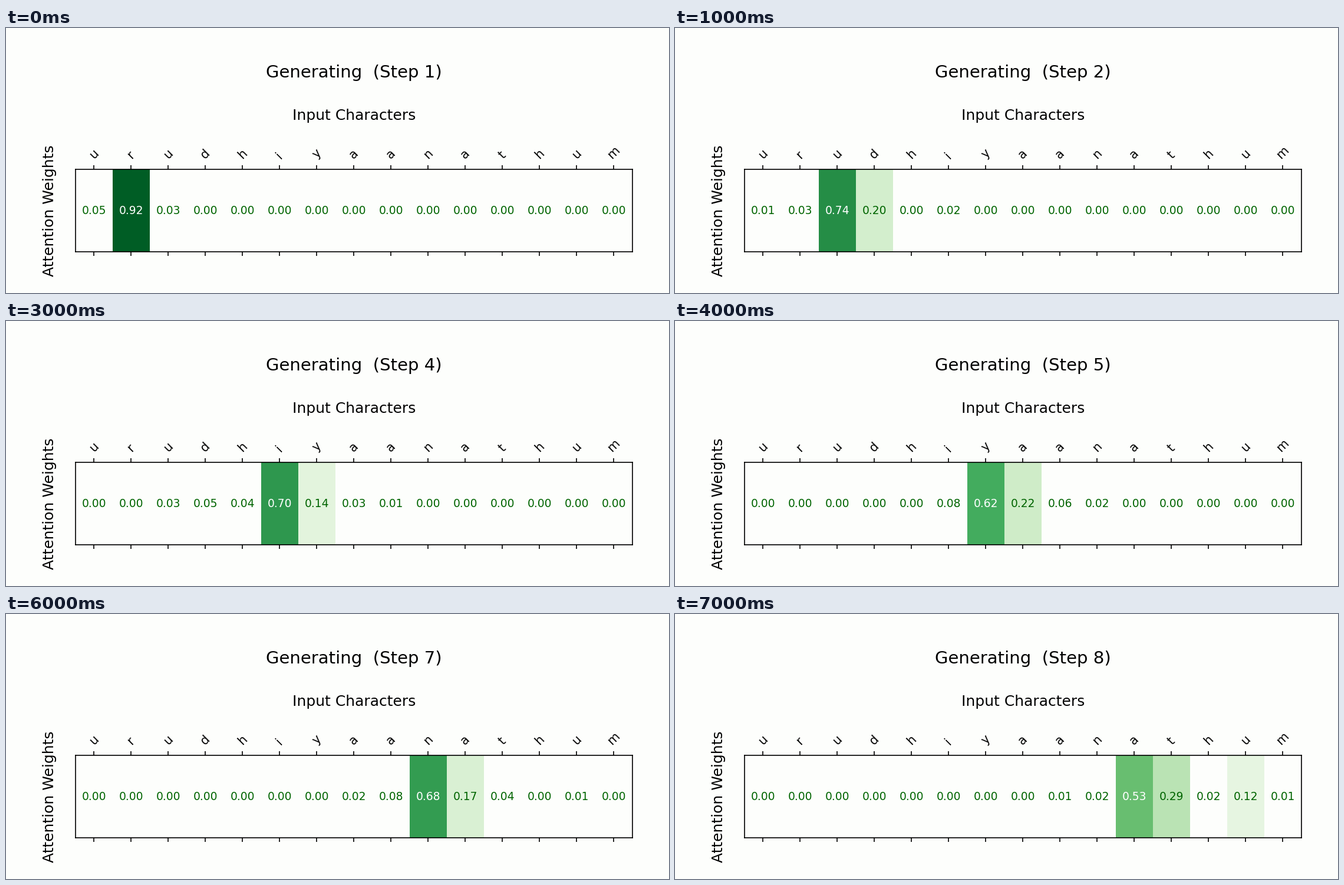
Recreate the animation shown at these times as a matplotlib script. Size 1125 px wide and 450 px high, loop 8 s.

```python
import numpy as np
import matplotlib.pyplot as plt
from matplotlib.animation import FuncAnimation

W, H, DPI = 1125, 450, 150
LEFT, TOP, CELL, TALL = 117.8, 240, 63, 140
CHARS = "urudhiyaanathum"
PAPER = "#fdfefc"

PULL = {"h": 0.15, "i": 3, "u": 3}  # letters that draw less or more attention
FOCUS = [0.92, 0.74, 0.57, 0.70, 0.62, 0.40, 0.68, 0.53]  # weight at the peak
BEHIND = [0.05, 0.04, 0.21, 0.13, 0.08, 0.01, 0.10, 0.03]  # weight left of it

plt.rcParams["font.family"] = "DejaVu Sans"
n = len(CHARS)
cols = np.arange(n)
pull = np.array([PULL.get(c, 1) for c in CHARS])

fig = plt.figure(figsize=(W / DPI, H / DPI), dpi=DPI, facecolor=PAPER)
ax = fig.add_axes([LEFT / W, 1 - (TOP + TALL) / H, n * CELL / W, TALL / H],
                  facecolor=PAPER)


def label(x, y, text, size, **kw):
    """Place text with its baseline at pixel coordinates from the top left."""
    return fig.text(x / W, 1 - y / H, text, size=size, ha="center",
                    va="baseline", **kw)


def weights(step):
    """A peak moving 4/3 columns per step, with a fading tail on each side."""
    peak = 1 + 4 * step // 3
    focus, behind = FOCUS[step], BEHIND[step]
    decay = max(0.9 - focus, 0.1)
    row = pull * decay ** abs(cols - peak)
    left, right = cols < peak, cols > peak
    row[left] *= behind / row[left].sum()
    row[right] *= (1 - focus - behind) / row[right].sum()
    row[peak] = focus
    return row


mid = LEFT + n * CELL / 2
title = label(mid, 84, "", 14)
label(mid, 156, "Input Characters", 12)
label(81, TOP + TALL / 2, "Attention Weights", 12, rotation=90,
      rotation_mode="anchor")

cmap = plt.get_cmap("Greens").with_extremes(bad=PAPER)
heat = ax.imshow(np.zeros((1, n)), cmap=cmap, vmin=0, vmax=1,
                 aspect="auto", interpolation="nearest")
ax.set_xticks(cols, CHARS, rotation=45, size=10)
ax.set_yticks([])
ax.tick_params(axis="x", top=True, bottom=True, labeltop=True,
               labelbottom=False)
values = [ax.text(i, 0, "", size=9, ha="center", va="center") for i in cols]


def update(step):
    row = weights(step)
    title.set_text(f"Generating  (Step {step + 1})")
    heat.set_data(np.ma.masked_less(row, 0.1)[None, :])
    for text, w in zip(values, row):
        text.set_text(f"{w:.2f}")
        text.set_color("white" if w > 0.5 else "darkgreen")
    return [title, heat, *values]


anim = FuncAnimation(fig, update, frames=len(FOCUS), interval=1000,
                     repeat=True, repeat_delay=0)
plt.show()
```
